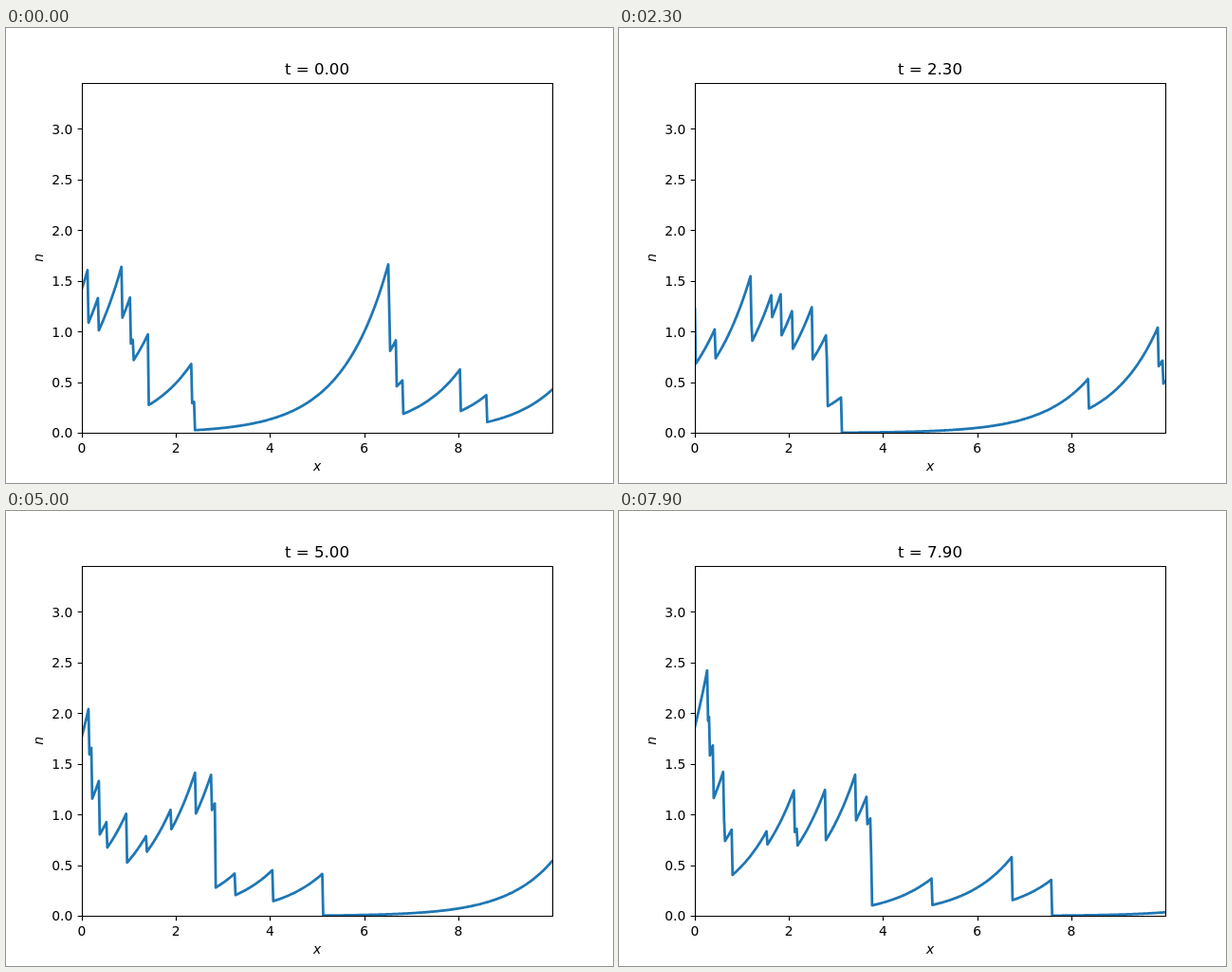
These frames come from a looping animation (640 px wide and 480 px high, 8 s). An HTML page:

```html
<!DOCTYPE html>
<html lang="en">
<head>
<meta charset="utf-8">
<title>Density plot</title>
<style>
  html, body { margin: 0; width: 100%; height: 100%; overflow: hidden; background: #fff; }
  svg { display: block; width: 640px; height: 480px; }
  text { font: 13.89px "DejaVu Sans", sans-serif; fill: #000; }
  .mid { text-anchor: middle; }
  .end { text-anchor: end; }
  .axis { font-style: italic; }
  #title { font-size: 16.67px; }
  #curve { fill: none; stroke: #1f77b4; stroke-width: 2.78; stroke-linejoin: round; stroke-linecap: square; }
  #frame { fill: none; stroke: #000; stroke-width: 1.11; }
</style>
</head>
<body>
<svg viewBox="0 0 640 480">
  <clipPath id="plot"><rect x="80" y="57.6" width="496" height="369.6"/></clipPath>
  <path id="curve" clip-path="url(#plot)"/>
  <path id="frame"/>
  <g id="labels"></g>
  <text class="mid axis" x="328" y="467">x</text>
  <text class="mid axis" transform="translate(39 242.4) rotate(-90)">n</text>
  <text class="mid" id="title" x="328" y="49"></text>
</svg>
<script>
const LOOP = 8000, STEP = 100;
const POINTS = 500, X_MAX = 10;
const MASS = 0.558, DECAY = 0.05;

// Each particle enters at x = 0: [entry time, constant speed].
const particles = [
  [-19.86, 0.51], [-19.12, 0.057], [-14.65, 0.587], [-14.46, 0.0975],
  [-13.74, 0.174], [-10.15, 0.672], [-9.9, 0.0354], [-6.81, 0.343],
  [-5.67, 1.42], [-5.15, 2.05], [-4.94, 0.2855], [-4.525, 1.443],
  [-3.66, 1.79], [-3.5, 1.91], [-3.023, 0.344], [-1.003, 0.8525],
  [-0.307, 0.4555], [1.467, 3], [2.25, 0.0565], [2.625, 0.4],
  [2.904, 1.351], [3.95, 0.2], [4.649, 1.052], [5.4, 0.244],
  [6.25, 1.68], [7.4, 0.56], [7.5, 0.975]
];

const $ = id => document.getElementById(id);
const px = x => 80 + 49.6 * x;
const py = n => 427.2 - 106.9 * n;
const snap = v => Math.round(v) + 0.5;

function addLabel(text, x, y, align) {
  const el = document.createElementNS("http://www.w3.org/2000/svg", "text");
  el.setAttribute("x", x);
  el.setAttribute("y", y);
  el.setAttribute("class", align);
  el.textContent = text;
  $("labels").append(el);
}

function drawAxes() {
  let d = "M80.5 58.5H576.5V427.5H80.5Z";
  for (let x = 0; x <= 8; x += 2) {
    d += `M${snap(px(x))} 427.5v4.86`;
    addLabel(x, px(x), 447.7, "mid");
  }
  for (let n = 0; n <= 3; n += 0.5) {
    d += `M80.5 ${snap(py(n))}h-4.86`;
    addLabel(n.toFixed(1), 70.3, py(n) + 5.2, "end");
  }
  $("frame").setAttribute("d", d);
}

// Every particle trails an exponential wake behind it.
function drawCurve(t) {
  const active = particles
    .filter(([entry]) => entry <= t)
    .map(([entry, speed]) => ({ x: speed * (t - entry), m: MASS * Math.exp(-DECAY * (t - entry)) }));
  const path = [];
  for (let i = 0; i < POINTS; i++) {
    const x = X_MAX * i / (POINTS - 1);
    let n = 0;
    for (const p of active) if (x <= p.x) n += p.m * Math.exp(x - p.x);
    path.push(px(x).toFixed(2) + " " + py(n).toFixed(2));
  }
  $("curve").setAttribute("d", "M" + path.join("L"));
}

const start = performance.now();
let shown = -1;

function render() {
  const step = Math.floor((performance.now() - start) % LOOP / STEP);
  if (step !== shown) {
    shown = step;
    const t = step * STEP / 1000;
    drawCurve(t);
    $("title").textContent = "t = " + t.toFixed(2);
  }
  requestAnimationFrame(render);
}

drawAxes();
render();
</script>
</body>
</html>
```
